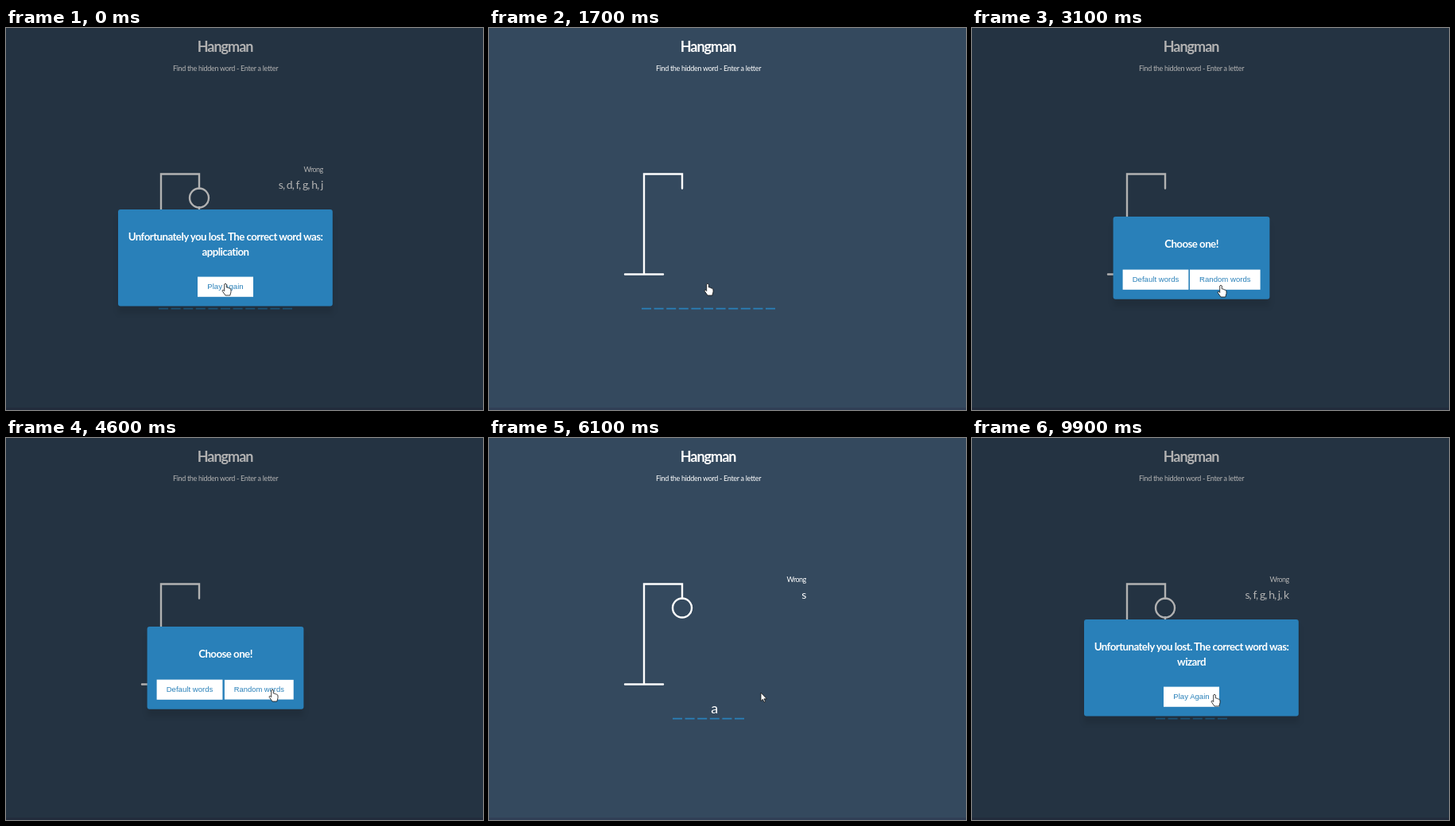
Write an HTML page that moves like this. It is 600x480 px and loops after 10 s.

```html
<!DOCTYPE html>
<html lang="en">
<head>
<meta charset="utf-8">
<title>Hangman</title>
<style>
  html, body { margin: 0; width: 100%; height: 100%; overflow: hidden; background: #34495e; }
  svg { display: block; width: 600px; height: 480px; }
  text { font: 9px Lato, "Open Sans", sans-serif; letter-spacing: -.31px; fill: #fff; text-anchor: middle; }
  .title { font-size: 18px; font-weight: 700; letter-spacing: -1px; }
  .head { font-size: 13.3px; font-weight: 700; letter-spacing: -.55px; }
  .right { text-anchor: end; }
  .label { letter-spacing: -.5px; }
  .misses { font-size: 14px; letter-spacing: -.95px; }
  .letter { font-size: 18px; letter-spacing: 0; }
  .figure { fill: none; stroke: #fff; stroke-width: 4; stroke-linecap: round; }
  .popup { fill: #2980b9; filter: drop-shadow(0 9px 3px rgba(0, 0, 0, .1)); }
  .button { transform-box: fill-box; transform-origin: center; }
  .button rect { fill: #fff; }
  .button text { font: 9.6px "Liberation Sans", Arial, sans-serif; letter-spacing: 0; fill: #2980b9; }
  .pressed { transform: scale(.98); }
  .cursor { fill: #fff; stroke: #111; stroke-width: .8; stroke-linejoin: round; }
</style>
</head>
<body>
<svg viewBox="0 0 600 480">
  <rect width="600" height="480" fill="#34495e"/>
  <rect y="477" width="600" height="3" fill="#303f56"/>
  <text class="title" x="275.6" y="30">Hangman</text>
  <text x="276" y="54">Find the hidden word - Enter a letter</text>

  <g class="figure" transform="translate(159 171.5) scale(.6)">
    <path d="M20 230H100M60 230V20H140V50"/>
    <circle class="part" cx="140" cy="70" r="20"/>
    <path class="part" d="M140 90V150"/>
    <path class="part" d="M140 110L120 130"/>
    <path class="part" d="M140 110L160 130"/>
    <path class="part" d="M140 150L120 180"/>
    <path class="part" d="M140 150L160 180"/>
  </g>

  <text class="right label" id="label" x="398.8" y="181">Wrong</text>
  <text class="right misses" id="misses" x="398.3" y="202"></text>
  <path id="blanks" stroke="#2980b9" stroke-width="1.8"/>
  <text class="letter" id="hitA" x="283.8" y="346">a</text>
  <text class="letter" id="hitD" x="315" y="346">d</text>

  <rect id="shade" width="600" height="480" opacity=".3"/>

  <g id="lost">
    <rect class="popup" x="141" y="228" width="269.8" height="121.6" rx="3"/>
    <text class="head" x="276" y="267">Unfortunately you lost. The correct word was:</text>
    <text class="head" id="answer" x="276" y="285.6"></text>
    <g class="button">
      <rect x="241" y="312.6" width="70" height="25.2"/>
      <text x="276" y="328">Play Again</text>
    </g>
  </g>

  <g id="choose">
    <rect class="popup" x="177.6" y="237" width="196.8" height="103.8" rx="3"/>
    <text class="head" x="276" y="276">Choose one!</text>
    <g class="button">
      <rect x="189.6" y="303.6" width="82.8" height="25.2"/>
      <text x="231" y="319.2">Default words</text>
    </g>
    <g class="button" id="random">
      <rect x="274" y="303.6" width="88.6" height="25.2"/>
      <text x="318.3" y="319.2">Random words</text>
    </g>
  </g>

  <g class="cursor" id="cursor">
    <path id="arrow" d="M0 0V10.5L2.4 8.3L4 12L5.6 11.3L4 7.8H7.3Z"/>
    <path id="hand" d="M-1.3 1Q0 -.8 1.3 1V4.8L3 5.1Q4 5.1 4.2 5.9L5.6 6.2Q7 6.5 7 8V10.5L5.8 15H0L-3.8 9.6Q-4.2 8 -2.6 8.2L-1.3 9.5Z"/>
  </g>
</svg>
<script>
  const LOOP = 10000, STEP = 100;
  const $ = id => document.getElementById(id);
  const show = (el, on) => { el.style.display = on ? '' : 'none'; };
  const parts = document.querySelectorAll('.part');

  const guesses = [['s', 5900], ['f', 6700], ['g', 7100], ['h', 7500], ['j', 7900], ['k', 9000]];
  // time, x, y of the pointer tip
  const route = [
    [0, 276, 321], [1300, 276, 321], [1400, 275, 321], [2500, 275, 321],
    [2800, 226, 320], [3100, 313, 323], [3600, 433, 434], [3700, 433, 434],
    [4500, 335, 316], [4700, 335, 316], [4900, 342, 320], [8600, 342, 320],
    [8800, 336, 312], [9500, 336, 312], [9900, 305, 322], [LOOP, 305, 322]
  ];

  function pointer(t) {
    const i = route.findIndex(p => p[0] > t);
    const [t0, x0, y0] = route[i - 1], [t1, x1, y1] = route[i];
    const k = (t - t0) / (t1 - t0), e = k * k * (3 - 2 * k);
    return [x0 + (x1 - x0) * e, y0 + (y1 - y0) * e];
  }

  function blanks(n) {
    const left = 276 - (n * 15.6 - 3.6) / 2;
    return Array.from({ length: n }, (_, i) => `M${left + i * 15.6} 352.6h12`).join('');
  }

  function overButton(x, y, scene) {
    if (scene === 'lost') return x > 241 && x < 311 && y > 312 && y < 338;
    return scene === 'choose' && y > 303 && y < 329 && x > 189 && x < 363 && (x < 272.4 || x > 274);
  }

  function draw(t) {
    const scene = t < 1600 || t >= 9000 ? 'lost' : t >= 1800 && t < 4700 ? 'choose' : 'play';
    const misses = t < 1600 ? [...'sdfghj'] : guesses.filter(g => t >= g[1]).map(g => g[0]);

    show($('lost'), scene === 'lost');
    show($('choose'), scene === 'choose');
    show($('shade'), scene !== 'play');
    show($('label'), misses.length);
    $('misses').textContent = misses.join(', ');
    parts.forEach((p, i) => show(p, i < misses.length));

    $('blanks').setAttribute('d', blanks(t < 1800 ? 11 : t < 4800 ? 0 : 6));
    show($('hitA'), t >= 5400);
    show($('hitD'), t >= 6300);
    $('answer').textContent = t < 1600 ? 'application' : 'wizard';
    $('random').classList.toggle('pressed', t >= 4500);

    // The hand lingers until the pointer moves after a click
    const [x, y] = pointer(t);
    const hand = scene === 'play' ? t < 4800 : overButton(x, y, scene);
    $('cursor').setAttribute('transform', `translate(${x} ${y})`);
    show($('hand'), hand);
    show($('arrow'), !hand);
  }

  const start = performance.now();
  function tick() {
    const t = (performance.now() - start) % LOOP;
    draw(Math.floor(t / STEP) * STEP);
    requestAnimationFrame(tick);
  }
  tick();
</script>
</body>
</html>
```
